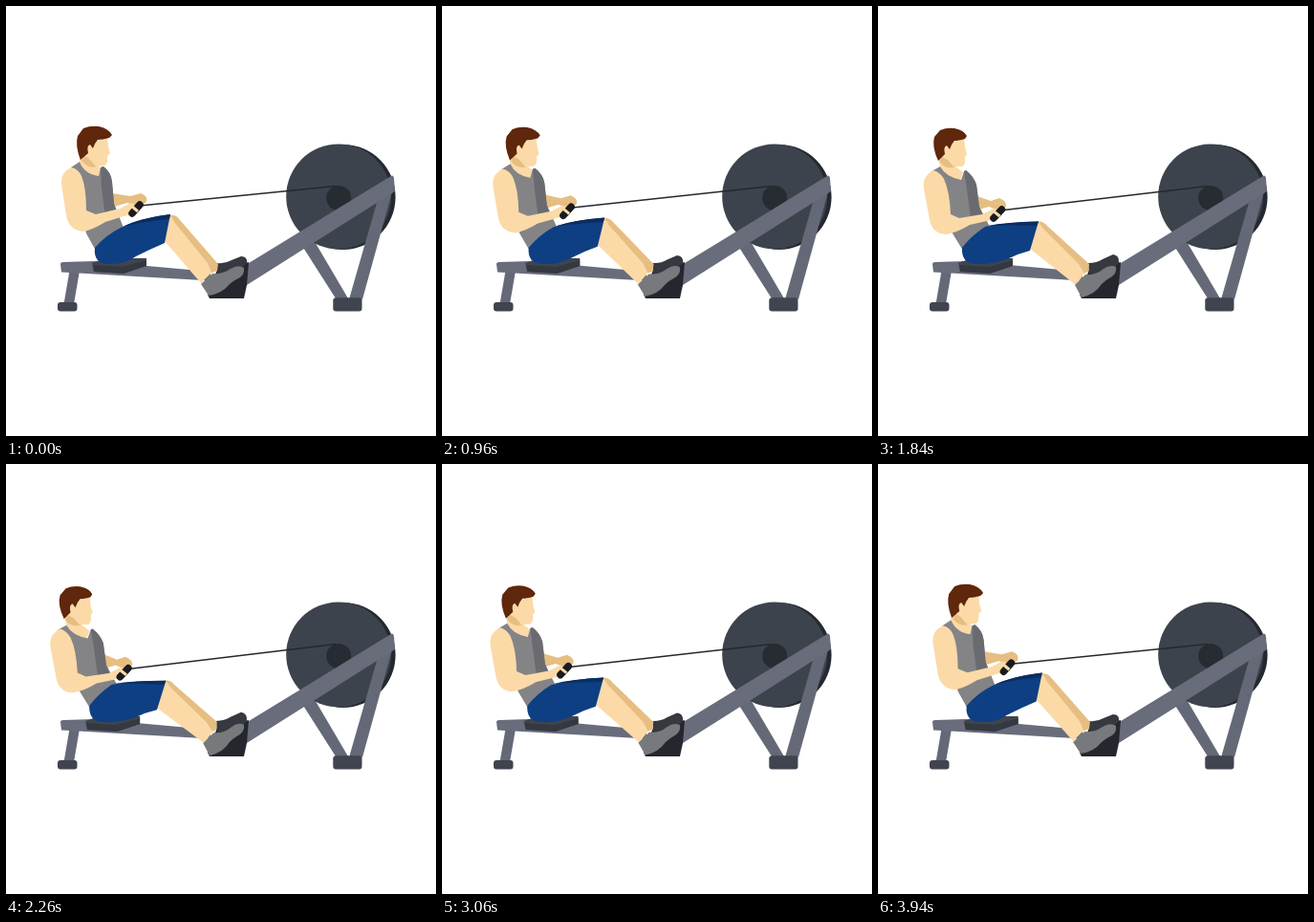
Recreate the animation shown at these times as an HTML page. Size 450 by 450 pixels, loop 3.96 s.

```html
<!DOCTYPE html>
<html lang="en">
<head>
<meta charset="utf-8">
<title>Rowing machine</title>
<style>
  html, body { margin: 0; width: 100%; height: 100%; overflow: hidden; background: #fff; }
  svg { display: block; width: 100vw; height: 100vh; }
</style>
</head>
<body>
<svg viewBox="0 0 450 450">
  <g id="machine">
    <path fill="#656977" d="M311.5 253.5L323 246.5L358 306H345Z"/>
    <circle cx="352.6" cy="199.9" r="55" fill="#24282f"/>
    <circle cx="348.2" cy="199.4" r="55" fill="#3d434c"/>
    <circle cx="348.2" cy="201" r="13" fill="#272b32"/>
    <path fill="#656977" d="M388 206L405 191L373 307H359Z"/>
    <path fill="#686c7b" d="M250 271.5L402 178.5Q405 176 406 180L407 194L388 206L252 292Z"/>
    <rect x="342.3" y="305.3" width="30.2" height="14.2" rx="3" fill="#40444e"/>
    <path fill="#656977" d="M66.5 277H77L71 312H60.5Z"/>
    <path fill="#686c7b" d="M57 270Q57 268 60 268L92 267L214 278V287.5L58 278.5Z"/>
    <rect x="54" y="310" width="20.5" height="9.5" rx="3" fill="#40444e"/>
    <path fill="#24272d" d="M211 302L221 276L254 268L252 292L249 306H213Z"/>
  </g>
  <g id="rower"></g>
</svg>
<script>
const NS = 'http://www.w3.org/2000/svg';
const LOOP = 3960, HOLD = 120, LEG = 560;
// Amount of lean back at each rest of the stroke
const stops = [0, 0.27, 0.6, 0.95, 1.15, 0.95, 0.3, 0.05];

const skin = '#fbdaa7', shade = '#e6be82';

// Each part: fill, upright outline, leaning outline
const parts = [
  // seat
  ['#40444d', 'M90 269L104 264L147 264V272L123 280L92 278Z',
              'M84 269L98 264L141 264V272L117 280L86 278Z'],
  ['#343840', 'M91 271L122 273L147 266V272L123 280L92 278Z',
              'M85 271L116 273L141 266V272L117 280L86 278Z'],
  // far shoe
  ['#36393f', 'M221 269Q229 270 236 266L246 262Q253 262 252 269L241 280L221 280Z',
              'M220 269Q229 269 235 265L246 260Q253 261 252 269L241 280L221 281Z'],
  // far calf
  [shade, 'M171 219Q178 218 182 224L222 270L221 277L211 281L174 235Z',
          'M166 226Q172 224 177 230L221 270L220 278L211 282L170 242Z'],
  // near calf
  [skin, 'M170 219Q174 220 176 226L211 269L215 279L204 290L166 246Z',
         'M166 226Q170 227 172 232L210 270L216 280L207 292L159 254Z'],
  // near shoe
  ['#77797d', 'M204 291L216 280Q227 281 235 275Q243 270 249 274Q250 280 245 284Q237 288 233 292Q226 301 212 303Z',
              'M206 292L217 281Q228 282 236 275Q243 270 249 273Q250 279 245 283Q238 287 234 291Q227 302 213 305Z'],
  // far arm
  [shade, 'M111 196L130 199L141 196Q149 199 147 205L138 211L127 206L113 210Z',
          'M104 199L118 204L127 201Q135 204 134 210L126 214L116 210L106 213Z'],
  // neck, jaw shadow and face
  [skin, 'M76 154L95 151L95 166L101 171L97 181L79 178Z',
         'M63 155L80 152L80 167L89 174L86 183L67 180Z'],
  [shade, 'M82 157L94 163L95 168Q87 171 79 162Z',
          'M67 158L79 164L81 168Q72 172 64 163Z'],
  [skin, 'M84 146L106 137L107 147L109 154L106 157Q107 165 103 167L94 168L88 161L83 154Z',
         'M69 147L90 138L91 148L93 155L91 158Q92 166 88 168L79 168L73 161L68 155Z'],
  // hair
  ['#5f270b', 'M78 161Q72 146 75 136L81 128Q88 125 97 126Q107 128 111 135L108 138Q101 140 96 140Q93 143 91 149L88 145Q84 146 86 154Z',
              'M63 162Q56 147 59 137L65 130Q72 127 80 128Q90 130 93 136L91 139Q84 141 80 141Q77 144 75 150L72 146Q68 147 70 155Z'],
  // vest
  ['#848487', 'M68 169L77 163Q82 176 97 178L99 169L102 168Q110 174 111 184L113 207L123 232L94 256L84 238Z',
              'M56 173L65 168Q71 179 87 182L90 173L92 172Q100 178 103 187L106 210L117 231L89 256L78 238Z'],
  ['#6a6b70', 'M99 169L102 168Q110 174 111 184L113 207L119 222L104 221L100 190Z',
              'M90 173L92 172Q100 178 103 187L106 210L112 224L97 222L93 192Z'],
  // shorts
  ['#0e3f83', 'M93 253Q104 240 120 232Q140 222 172 218L166 248Q152 254 136 262Q123 271 108 270Q91 270 93 253Z',
              'M88 253Q97 241 112 231Q135 226 168 225.5L159 256Q147 259 135 265Q119 271 103 270Q87 270 88 253Z'],
  ['#0b2d60', 'M122 231Q140 222 172 218L171 223Q146 225 122 231Z',
              'M114 230Q135 226 168 225.5L166 230Q140 229 114 230Z'],
  // near arm
  [skin, 'M69 169Q57 173 58 187L63 219Q66 235 81 236Q91 234 104 226L133 217L137 209L131 206L119 212L94 218L84 214Q84 190 79 178Q76 171 69 169Z',
         'M58 172Q46 178 48 191L54 224Q57 238 71 239Q83 237 96 229L123 223L128 214L121 212L109 218L85 222L76 218Q75 194 69 181Q65 174 58 172Z']
];

const lean = (a, b, s) => {
  const end = b.match(/[\d.]+/g);
  let i = 0;
  return a.replace(/[\d.]+/g, n => (+n + (end[i++] - n) * s).toFixed(2));
};

const rower = document.getElementById('rower');
const add = attrs => {
  const el = document.createElementNS(NS, 'path');
  for (const k in attrs) el.setAttribute(k, attrs[k]);
  return rower.appendChild(el);
};
const line = (stroke, width, cap) =>
  add({ fill: 'none', stroke, 'stroke-width': width, 'stroke-linecap': cap });

const shapes = parts.map(([fill, a, b]) => ({ el: add({ fill }), a, b }));
shapes.push(
  { el: line('#25282d', 1.6, 'butt'), a: 'M140 209L345 188.5', b: 'M128 214L345 188.5' },
  { el: line('#191b1f', 7.5, 'round'), a: 'M132 217L140 208', b: 'M121 222L129.5 213' },
  { el: line(skin, 3, 'butt'), a: 'M131 209L138 215', b: 'M120 214L127.5 220' }
);

// Steps come in threes: two quick ones, then a pause
const leanAt = t => {
  const u = t % LOOP - HOLD;
  if (u < 0) return stops[0];
  const i = Math.floor(u / LEG), v = u % LEG;
  const step = 3 * Math.floor(v / 140) + Math.min(2, Math.floor(v % 140 / 20));
  return stops[i] + (stops[i + 1] - stops[i]) * (step + 1) / 12;
};

const draw = t => {
  const s = leanAt(t);
  for (const { el, a, b } of shapes) el.setAttribute('d', lean(a, b, s));
};

const start = performance.now();
const tick = () => {
  draw(performance.now() - start);
  requestAnimationFrame(tick);
};
draw(0);
requestAnimationFrame(tick);
</script>
</body>
</html>
```
